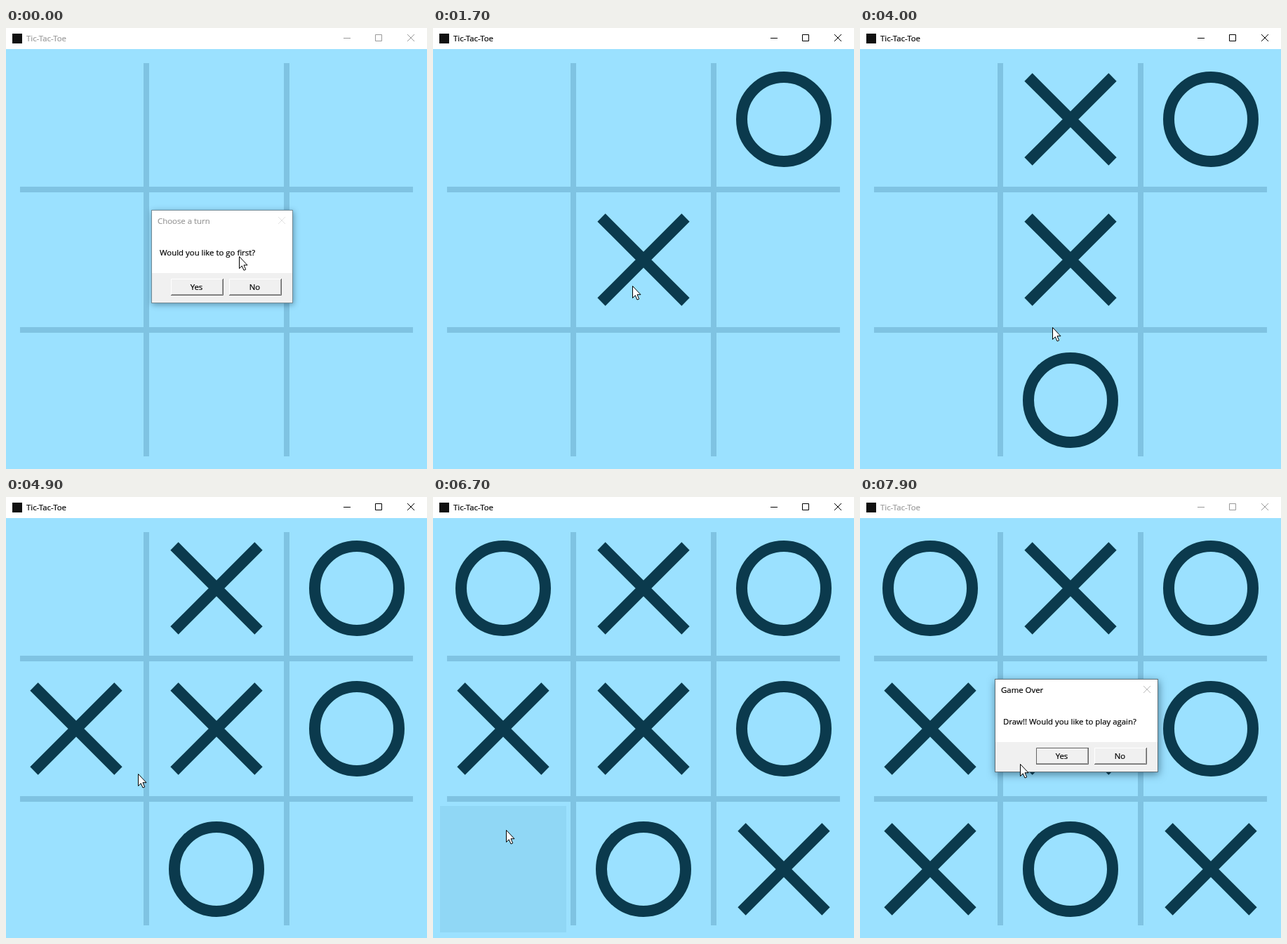
These frames come from a looping animation (600x628 px, 8000 ms). An HTML page:

```html
<!DOCTYPE html>
<html lang="en">
<head>
<meta charset="utf-8">
<title>Tic-Tac-Toe</title>
<style>
  html, body { margin: 0; width: 100%; height: 100%; overflow: hidden; background: #9be1ff; }
  svg { display: block; width: 600px; height: 628px; }
  text {
    font: 11.4px "Open Sans", "Noto Sans", sans-serif;
    fill: currentColor; stroke: currentColor; stroke-width: .2px;
  }
  .dialog { transform-box: fill-box; transform-origin: center; }
  #turn { filter: drop-shadow(1px 2px 4px rgba(0, 30, 50, .4)); }
  #over { filter: drop-shadow(1px 3px 6px rgba(0, 30, 50, .5)); }
</style>
</head>
<body>
<svg viewBox="0 0 600 628" id="stage"></svg>
<script>
const LOOP = 8000, STEP = 100, CELL = 200, TOP = 30;
const DIALOG_CLOSES = 610, ACTIVATED = 800, DIALOG_OPENS = 7000, FADE = 300;

// The player takes a cell (0 to 8) and the computer answers at once.
const rounds = [
  { at: 1400, x: 4, o: 2 },
  { at: 3200, x: 1, o: 7 },
  { at: 4700, x: 3, o: 5 },
  { at: 5800, x: 8, o: 0 },
  { at: 6800, x: 6 }
];

// Pointer strokes; bend pushes the middle of the stroke sideways.
const home = { x: 332, y: 325 };
const strokes = [
  { from: 100, to: 500, x: 284, y: 367 },
  { from: 1800, to: 2700, x: 306, y: 157, bend: 175 },
  { from: 3200, to: 3900, x: 274, y: 426 },
  { from: 4000, to: 4500, x: 128, y: 368 },
  { from: 4700, to: 5500, x: 514, y: 535 },
  { from: 5800, to: 6600, x: 104, y: 474, bend: 65 },
  { from: 7200, to: 7700, x: 228, y: 380 }
];

const clamp = v => Math.min(1, Math.max(0, v));
const smooth = p => p * p * (3 - 2 * p);
const $ = id => document.getElementById(id);
const place = cell => ({ x: cell % 3 * CELL, y: TOP + Math.floor(cell / 3) * CELL });

const rect = (x, y, w, h, fill, extra = '') =>
  `<rect x="${x}" y="${y}" width="${w}" height="${h}" fill="${fill}" ${extra}/>`;
const path = (d, stroke, width = 1, extra = '') =>
  `<path d="${d}" fill="none" stroke="${stroke}" stroke-width="${width}" ${extra}/>`;
const label = (x, y, s, extra = '') => `<text x="${x}" y="${y}" ${extra}>${s}</text>`;
const cross = (x, y, r) => `M${x - r} ${y - r}l${2 * r} ${2 * r}m0 ${-2 * r}l${-2 * r} ${2 * r}`;
const ring = (x, y, r) => `M${x - r} ${y}a${r} ${r} 0 1 0 ${2 * r} 0a${r} ${r} 0 1 0 ${-2 * r} 0z`;

function button(x, caption, focused) {
  const y = 357, right = x + 75, bottom = y + 24;
  return path(`M${x + .5} ${bottom}V${y + .5}H${right}`, focused ? '#646464' : '#fff') +
    path(`M${x + 1} ${bottom - 1.5}H${right - 1.5}V${y + 1}`, '#a0a0a0') +
    path(`M${x} ${bottom - .5}H${right - .5}V${y}`, '#646464') +
    label(x + 36.5, 373, caption, 'text-anchor="middle"');
}

function dialog(id, x, right, title, message, focused) {
  const width = right - x;
  return `<g id="${id}" class="dialog">` +
    rect(x + .5, 259.5, width - 1, 132, '#fff') +
    rect(x + 1, 349, width - 2, 42, '#f0f0f0') +
    rect(x + .5, 259.5, width - 1, 132, 'none', `stroke="${focused ? '#5f7078' : '#748b95'}"`) +
    label(x + 9, 279, title, 'class="caption"') +
    path(cross(right - 16, 274, 5), focused ? '#bbb' : '#e2e2e2') +
    label(x + 12, 324, message) +
    button(right - 174, 'Yes', focused) + button(right - 91, 'No', false) + '</g>';
}

function mark(shape, cell) {
  if (cell === undefined) return '';
  const { x, y } = place(cell);
  return path(shape(x + 100, y + 100, 60), '#0b3a4d', 16);
}

$('stage').innerHTML =
  rect(0, 0, 600, 628, '#9be1ff') +
  rect(0, 0, 600, TOP, '#fff') +
  rect(9, 8, 14, 14, '#111') +
  '<g id="chrome">' + label(29, 19, 'Tic-Tac-Toe') +
  path('M481 14.5h10M526.5 9.5h9v9h-9z' + cross(577, 14, 5), 'currentColor') + '</g>' +
  rect(10, 10, 180, 180, '#90d7f5', 'id="hover"') +
  path('M200 50V610M400 50V610M20 230H580M20 430H580', '#7fc3e2', 8) +
  rounds.map((r, i) => `<g id="round${i}">${mark(cross, r.x)}${mark(ring, r.o)}</g>`).join('') +
  dialog('turn', 207, 409, 'Choose a turn', 'Would you like to go first?', false) +
  dialog('over', 192, 425, 'Game Over', 'Draw!! Would you like to play again?', true) +
  `<g id="arrow"><path d="M.5 .5V17.5L4.3 13.8L7 20L9.7 18.9L7 12.7H12Z" fill="#fff" stroke="#000"/></g>` +
  `<g id="busy">${path(ring(0, 0, 7), '#2c93df', 7)}` +
  path('M0 -7A7 7 0 0 1 7 0', '#58b2ee', 3, 'id="glint"') + '</g>';

function pointerAt(t) {
  let { x, y } = home;
  for (const s of strokes) {
    const p = smooth(clamp((t - s.from) / (s.to - s.from)));
    const dx = s.x - x, dy = s.y - y;
    const push = (s.bend || 0) * Math.sin(Math.PI * p) / Math.hypot(dx, dy);
    x += dx * p - dy * push;
    y += dy * p + dx * push * Math.sign(dx * dy || 1);
    if (p < 1) break;
  }
  return { x: Math.round(x), y: Math.round(y) };
}

const show = (id, on) => { $(id).style.visibility = on ? 'visible' : 'hidden'; };
const move = (id, { x, y }) => $(id).setAttribute('transform', `translate(${x} ${y})`);

function fade(id, opacity) {
  show(id, opacity > 0);
  $(id).style.opacity = opacity;
  $(id).style.transform = opacity < 1 ? `scale(${.95 + .05 * opacity})` : 'none';
}

function render(t) {
  const pointer = pointerAt(t);
  const active = t >= ACTIVATED && t < DIALOG_OPENS;
  $('chrome').style.color = active ? '#000' : '#999';
  document.querySelector('#turn .caption').style.color = t < 500 ? '#999' : '#000';

  const cell = Math.floor(pointer.x / CELL) + 3 * Math.floor((pointer.y - TOP) / CELL);
  const taken = rounds.some(r => r.at <= t && (r.x === cell || r.o === cell));
  show('hover', active && !taken);
  move('hover', place(cell));
  rounds.forEach((r, i) => show('round' + i, t >= r.at));

  fade('turn', 1 - clamp((t - DIALOG_CLOSES) / FADE));
  fade('over', 1 - (1 - clamp((t - DIALOG_OPENS) / FADE)) ** 2);

  const waiting = t >= 6900 && t < 7200;
  show('arrow', !waiting);
  show('busy', waiting);
  move('arrow', pointer);
  move('busy', pointer);
  $('glint').setAttribute('transform', `rotate(${t * .36})`);
}

const start = performance.now();
function tick() {
  const t = (performance.now() - start) % LOOP;
  render(Math.floor(t / STEP) * STEP);
  requestAnimationFrame(tick);
}
tick();
</script>
</body>
</html>
```
